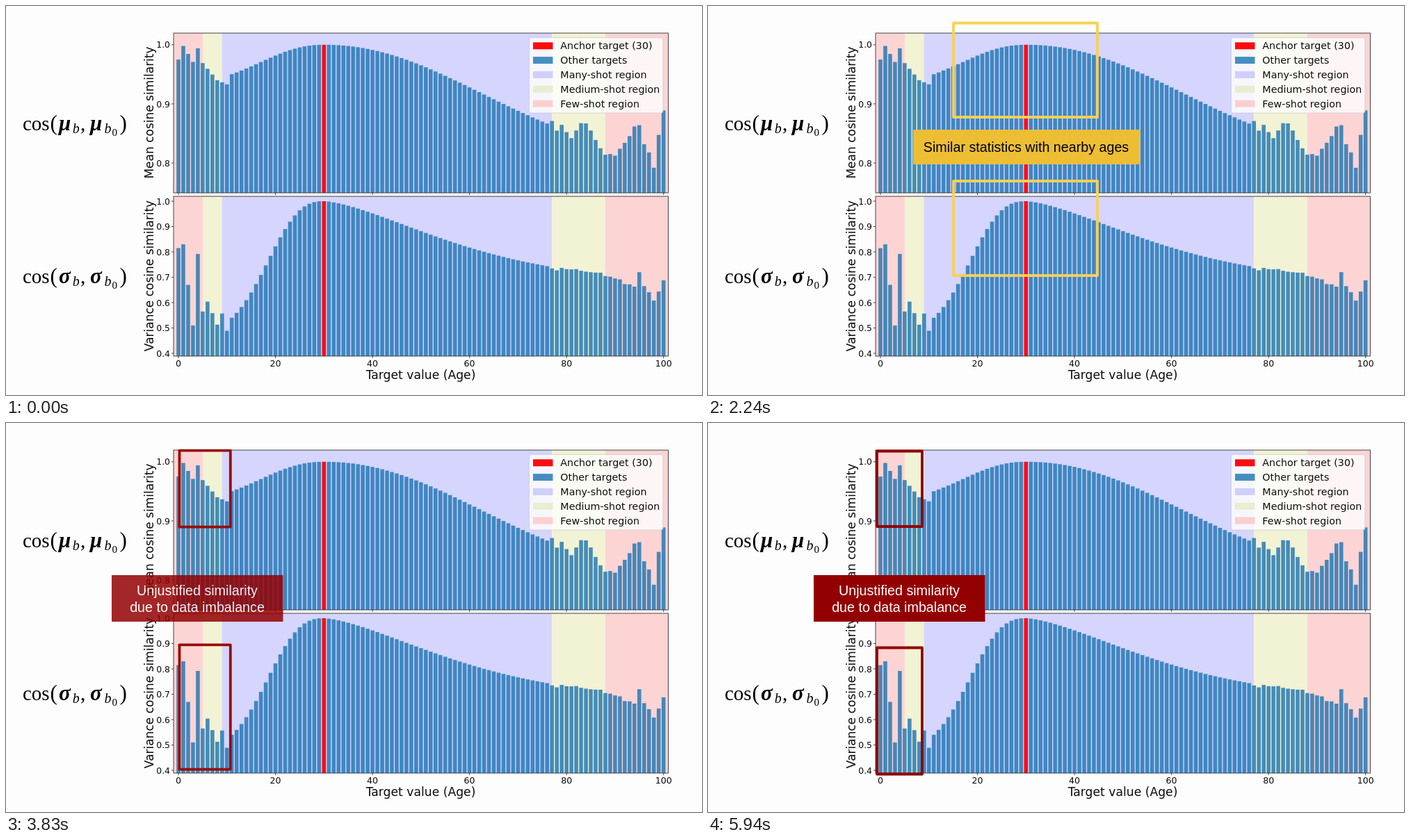
An HTML page for the animation above (5970 ms loop, 1001 px wide and 560 px high).

```html
<!DOCTYPE html>
<html lang="en">
<head>
<meta charset="utf-8">
<title>Feature statistics similarity</title>
<style>
html, body { margin: 0; width: 100%; height: 100%; overflow: hidden; background: #fdfdfd; }
svg { display: block; width: 1001px; height: 560px; }
.plot { font-family: "DejaVu Sans", sans-serif; }
.math { font-family: "Liberation Serif", serif; }
.note { font-family: "Liberation Sans", Arial, sans-serif; font-size: 19.7px; text-anchor: middle; }
</style>
</head>
<body>
<svg id="stage" viewBox="0 0 1001 560"></svg>
<script>
const NS = "http://www.w3.org/2000/svg";
const stage = document.getElementById("stage");
const LOOP = 5970;

function add(parent, tag, attrs, text) {
  const el = document.createElementNS(NS, tag);
  for (const k in attrs) el.setAttribute(k, attrs[k]);
  if (text !== undefined) el.textContent = text;
  parent.appendChild(el);
  return el;
}
const rect = (p, x, y, width, height, fill, more) =>
  add(p, "rect", { x, y, width, height, fill, ...more });
const label = (p, x, y, size, text, more) =>
  add(p, "text", { x, y, "font-size": size, ...more }, text);

// Data: a bell around the anchor, key points in the sparse ages at both ends
const ANCHOR = 30;
const bell = (floor, width, power) => d =>
  floor + (1 - floor) * Math.exp(-Math.pow(d / width, power));

function noise(seed) {
  return () => {
    seed = (seed * 16807) % 2147483647;
    return seed / 2147483647 * 2 - 1;
  };
}

function along(keys, age) {
  const i = keys.findIndex(([a]) => a >= age);
  const [a1, v1] = keys[i];
  if (a1 === age) return v1;
  const [a0, v0] = keys[i - 1];
  return v0 + (v1 - v0) * (age - a0) / (a1 - a0);
}

function series({ young, rise, fall, old, rough }) {
  const rnd = noise(30);
  return Array.from({ length: 101 }, (_, age) => {
    if (age <= young.at(-1)[0]) return along(young, age);
    if (age < old[0][0]) return age < ANCHOR ? rise(ANCHOR - age) : fall(age - ANCHOR);
    const isKey = old.some(([a]) => a === age);
    return along(old, age) + (isKey ? 0 : rough * rnd());
  });
}

const mean = series({
  young: [[0, .975], [1, .998], [3, .971], [4, .994], [5, .969], [8, .94], [10, .933]],
  rise: bell(.93, 17.2, 2.2),
  fall: bell(.8, 44, 2.1),
  old: [[77, .871], [81, .842], [84, .867], [88, .814], [91, .824], [95, .864], [98, .792], [100, .889]],
  rough: .009
});
const variance = series({
  young: [[0, .815], [1, .83], [3, .51], [4, .792], [5, .565], [6, .604], [8, .513], [9, .557], [10, .489]],
  rise: bell(.48, 14.06, 2.55),
  fall: bell(.68, 33.5, 1.5),
  old: [[77, .735], [87, .718], [94, .663], [95, .72], [96, .665], [98, .608], [100, .688]],
  rough: .006
});

// Chart
const LEFT = 241, RIGHT = 952.5, HEIGHT = 230;
const PINK = "#fdd4d4", OLIVE = "#f2f2d4", LILAC = "#d5d5fe", BLUE = "#1f77b4", RED = "#ff0b0f";
const xOf = v => 248 + 6.977 * v;
const plot = add(stage, "g", { class: "plot", fill: "#0c0c0c" });

function panel(top, data, title, lowest, yOne, scale) {
  const bottom = top + HEIGHT;
  const yOf = v => yOne + (1 - v) * scale;
  const edges = [LEFT, xOf(5), xOf(9), xOf(77), xOf(88), RIGHT];
  [PINK, OLIVE, LILAC, OLIVE, PINK].forEach((c, i) =>
    rect(plot, edges[i], top, edges[i + 1] - edges[i], HEIGHT, c));
  data.forEach((v, age) => {
    const main = age === ANCHOR;
    rect(plot, xOf(age) - 2.8, yOf(v), 5.6, bottom - yOf(v), main ? RED : BLUE,
      { "fill-opacity": main ? 1 : 0.82 });
  });
  rect(plot, LEFT, top, RIGHT - LEFT, HEIGHT, "none", { stroke: "#333", "stroke-width": 0.9 });
  let marks = "";
  for (let v = 0; v <= 100; v += 20) marks += `M${xOf(v)} ${bottom}v3`;
  for (let n = 10; n >= lowest; n--) {
    const y = yOf(n / 10);
    marks += `M${LEFT} ${y}h-3`;
    label(plot, 236, y + 4.6, 12.4, (n / 10).toFixed(1), { "text-anchor": "end" });
  }
  add(plot, "path", { d: marks, stroke: "#333", "stroke-width": 0.9 });
  label(plot, 0, 0, 17, title, {
    "text-anchor": "middle", transform: `translate(211.5 ${top + 114.5}) rotate(-90)`
  });
}

panel(39, mean, "Mean cosine similarity", 8, 55.8, 851);
panel(274, variance, "Variance cosine similarity", 4, 281, 365);
for (let v = 0; v <= 100; v += 20)
  label(plot, xOf(v), 518.6, 12.6, v, { "text-anchor": "middle" });
label(plot, 596.5, 537, 17.2, "Target value (Age)", { "text-anchor": "middle" });

// Legend
rect(plot, 752.5, 45.5, 192.5, 108.5, "#fff", { rx: 3, "fill-opacity": 0.8, stroke: "#ccc", "stroke-opacity": 0.8 });
[["Anchor target (30)", RED, 1], ["Other targets", BLUE, 0.82], ["Many-shot region", "#cfcffe", 1],
 ["Medium-shot region", "#e9edd1", 1], ["Few-shot region", "#fccfcf", 1]].forEach(([text, color, alpha], i) => {
  const y = 52.3 + i * 20.8;
  rect(plot, 758, y, 28.5, 10, color, { "fill-opacity": alpha });
  label(plot, 797.3, y + 10, 14.3, text);
});

// Formulas
function formula(y, symbol) {
  const g = add(stage, "g", { class: "math", fill: "#000" });
  const bold = { "font-weight": "bold", "font-style": "italic" };
  const italic = { "font-style": "italic" };
  label(g, 24, y, 29, "cos");
  label(g, 63.5, y, 31, "(");
  label(g, 76, y, 31, symbol, bold);
  label(g, 95.8, y + 4, 20, "b", italic);
  label(g, 107, y, 29, ",");
  label(g, 121, y, 31, symbol, bold);
  label(g, 141.5, y + 4, 20, "b", italic);
  label(g, 152.5, y + 8, 15, "0");
  label(g, 163.5, y, 31, ")");
}
formula(179, "μ");
formula(399, "σ");

// Highlights
const frames = [0, 1].map(() => add(stage, "rect", {
  fill: "none", "stroke-width": 3.8, "stroke-linejoin": "round"
}));
function banner(x, y, w, h, fill, ink, lines) {
  const g = add(stage, "g", { class: "note", fill: ink });
  rect(g, x, y, w, h, fill);
  lines.forEach(([text, cx, cy]) => add(g, "text", { x: cx, y: cy }, text));
  return g;
}
const nearby = banner(295, 178, 326.5, 50, "#edbd34", "#000",
  [["Similar statistics with nearby ages", 457.5, 210]]);
const unjust = banner(152, 219, 246.5, 67, "#930001", "#fff",
  [["Unjustified similarity", 275, 248.3], ["due to data imbalance", 275, 272.3]]);

// Frame corners [x0, y0, x1, y1] for each panel
const ENTRY = [[358, 24.5, 567, 160], [358, 249, 567, 385]];
const NEAR = [[353, 24.5, 560, 160], [353, 252, 560, 388]];
const FEW = [[243, 40.5, 308, 149], [243, 323.5, 308, 505.5]];
const YELLOW = [252, 208, 82], DARK_RED = [145, 0, 1];

const clamp = v => Math.min(1, Math.max(0, v));
const ease = f => 0.5 - 0.5 * Math.cos(Math.PI * f);
const mix = (a, b, k) => a.map((v, i) => v + (b[i] - v) * k);

function draw(t) {
  const show = clamp((t - 1230) / 700);
  const morph = clamp((t - 3240) / 700);
  const k = ease(morph);
  frames.forEach((el, i) => {
    const [x0, y0, x1, y1] = mix(mix(ENTRY[i], NEAR[i], ease(show)), FEW[i], k);
    el.setAttribute("x", x0);
    el.setAttribute("y", y0);
    el.setAttribute("width", x1 - x0);
    el.setAttribute("height", y1 - y0);
    el.setAttribute("stroke", `rgb(${mix(YELLOW, DARK_RED, k).map(Math.round)})`);
    el.setAttribute("opacity", show);
  });
  nearby.setAttribute("opacity", show * clamp(1 - 2 * morph));
  unjust.setAttribute("opacity", morph);
}

const start = performance.now();
function tick() {
  draw((performance.now() - start) % LOOP);
  requestAnimationFrame(tick);
}
tick();
</script>
</body>
</html>
```
